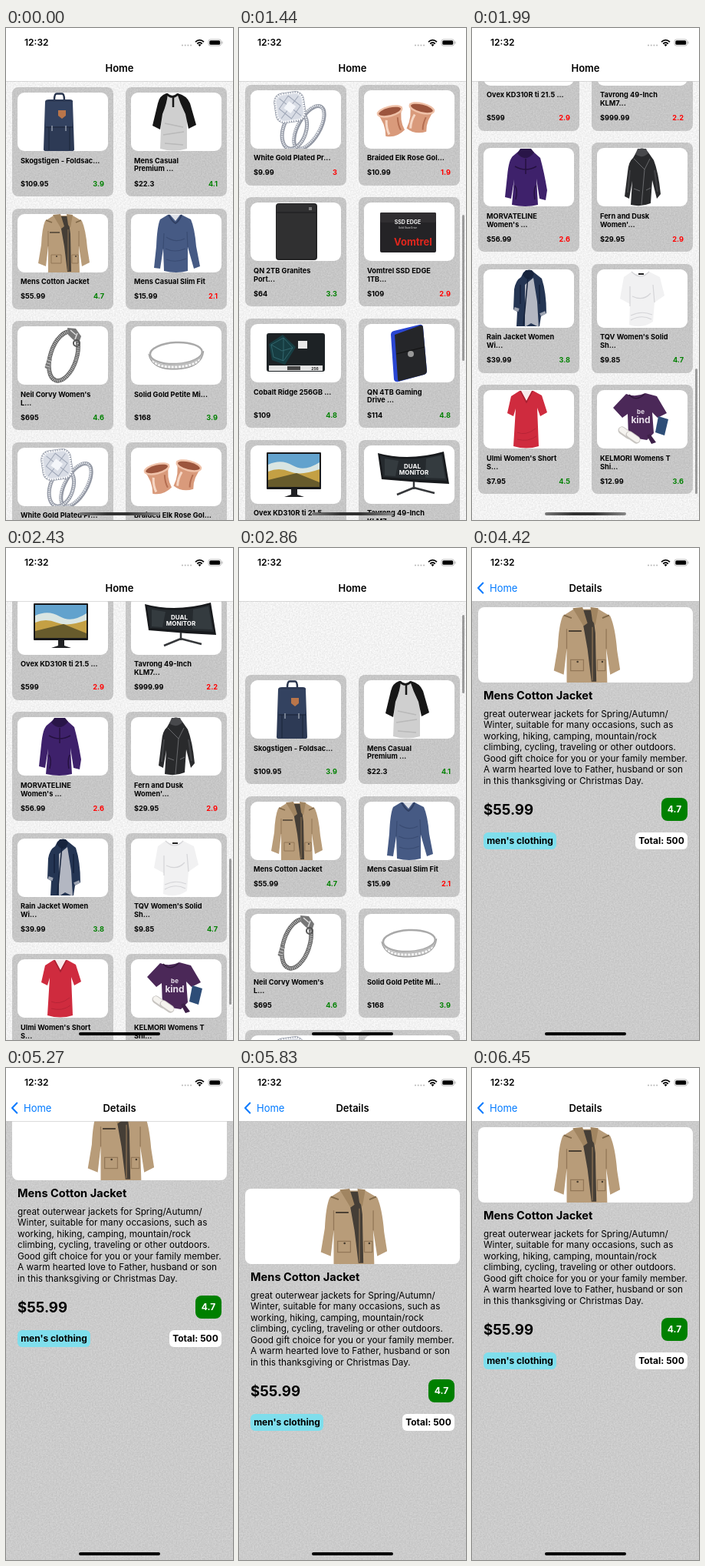
Animation of 296 by 640 pixels, one loop 6.55 s. Source, as an HTML page:

```html
<!DOCTYPE html>
<html lang="en">
<head>
<meta charset="utf-8">
<title>Shop</title>
<style>
html, body { margin: 0; width: 296px; height: 640px; overflow: hidden; background: #fff; }
body { position: relative; font: 600 13px/16px Inter, sans-serif; color: #000; }
div, svg { position: absolute; white-space: pre; }
svg { left: 0; top: 0; }
.page { inset: 0; overflow: hidden; background: #fff; will-change: transform; }
.scroll { left: 0; top: 0; width: 296px; will-change: transform; }
#details { background: #d6d6d6; }

.card { width: 132px; border-radius: 8px; background: rgba(0,0,0,.18); font: 700 9.2px/10.9px Inter, sans-serif; }
.photo { left: 7px; top: 7px; width: 118px; height: 76px; border-radius: 9px; background: #fff; overflow: hidden; }
.name { left: 11px; top: 90.5px; }
.price { left: 11px; bottom: 10.5px; }
.rate { right: 12px; bottom: 10.5px; color: #008000; }
.low { color: #f00; }
#thumb { left: 291px; width: 3px; border-radius: 2px; background: rgba(0,0,0,.36); }

.bar { left: 0; top: 0; width: 296px; height: 69px; background: #fff; box-shadow: 0 .6px 0 #c4c4c4; overflow: hidden; }
.title { left: 0; top: 44px; width: 296px; text-align: center; }
#back { left: 23px; top: 44px; font-weight: 400; color: #007aff; }
.clock { left: 24px; top: 11px; font-size: 12px; }

.hero { left: 8px; top: 77px; width: 280px; height: 98px; border-radius: 8px; background: #fff; overflow: hidden; }
.head { left: 15px; top: 183px; font: 700 14.6px/18px Inter, sans-serif; }
.about { left: 15px; top: 208.8px; font: 400 11.75px/14.45px Inter, sans-serif; }
.cost { left: 15px; top: 328px; font: 700 18.6px/24px Inter, sans-serif; }
.tag { height: 22px; border-radius: 6px; text-align: center; font: 700 12px/22px Inter, sans-serif; }
#home { left: 95px; top: 630px; width: 106px; height: 4px; border-radius: 2px; }
</style>
</head>
<body>
<div class="page" id="list">
  <svg width="296" height="640">
    <filter id="grain" x="0" y="0" width="1" height="1" color-interpolation-filters="sRGB">
      <feTurbulence type="fractalNoise" baseFrequency=".55" numOctaves="2" seed="4"/>
      <feColorMatrix values="0 0 0 0 0  0 0 0 0 0  0 0 0 0 0  .14 0 0 0 -.02"/>
    </filter>
    <rect width="296" height="640" filter="url(#grain)"/>
  </svg>
  <div class="scroll" id="grid"></div>
  <div id="thumb"></div>
</div>

<div class="page" id="details">
  <svg width="296" height="640"><rect width="296" height="640" filter="url(#grain)"/></svg>
  <div class="scroll" id="info">
    <div class="hero"><svg id="hero" width="280" height="98" viewBox="0 0 118 76"></svg></div>
    <div class="head">Mens Cotton Jacket</div>
    <div class="about">great outerwear jackets for Spring/Autumn/
Winter, suitable for many occasions, such as
working, hiking, camping, mountain/rock
climbing, cycling, traveling or other outdoors.
Good gift choice for you or your family member.
A warm hearted love to Father, husband or son
in this thanksgiving or Christmas Day.</div>
    <div class="cost">$55.99</div>
    <div class="tag" style="left:247px;top:325px;width:34px;height:30px;line-height:30px;border-radius:8px;background:#008000;color:#fff">4.7</div>
    <div class="tag" style="left:15px;top:370px;width:95px;background:#7fdeec">men's clothing</div>
    <div class="tag" style="left:213px;top:370px;width:68px;background:#fff">Total: 500</div>
  </div>
</div>

<div class="bar">
  <div class="clock">12:32</div>
  <svg width="296" height="69" fill="none">
    <path d="M230 22.5h13" stroke="#b5b5b5" stroke-width="2" stroke-linecap="round" stroke-dasharray="0 3.7"/>
    <path d="M247 18.2q5.5-5 11 0M249.2 20.5q3.3-3 6.6 0" stroke="#000" stroke-width="1.7"/>
    <path d="M250.5 21.8q2-1.6 4 0l-2 2.2z" fill="#000"/>
    <rect x="264" y="14.9" width="16.5" height="8.2" rx="2.5" stroke="#aaa" stroke-width=".8"/>
    <rect x="265.3" y="16.2" width="13.9" height="5.6" rx="1.5" fill="#000"/>
    <path d="M282 17.5v3" stroke="#aaa"/>
    <path id="chevron" d="M14.3 45.5L8 52l6.3 6.500" stroke="#007aff" stroke-width="2" stroke-linecap="round" stroke-linejoin="round"/>
  </svg>
  <div class="title" id="homeTitle">Home</div>
  <div id="back">Home</div>
  <div class="title" id="detailTitle">Details</div>
</div>
<div id="home"></div>

<script>
const $ = id => document.getElementById(id);
const fill = (d, c) => `<path d="${d}" fill="${c}"/>`;
const line = (d, c, w = 1, extra = '') => `<path d="${d}" fill="none" stroke="${c}" stroke-width="${w}" ${extra}/>`;
const oval = (x, y, rx, ry, c, w, extra = '') =>
  `<ellipse cx="${x}" cy="${y}" rx="${rx}" ry="${ry}" fill="none" stroke="${c}" stroke-width="${w}" ${extra}/>`;
const box = (x, y, w, h, c, r = 0) => `<rect x="${x}" y="${y}" width="${w}" height="${h}" rx="${r}" fill="${c}"/>`;
const label = (x, y, size, c, s) => `<text x="${x}" y="${y}" font-size="${size}" fill="${c}" text-anchor="middle">${s}</text>`;
const turn = (a, x, y, s) => `<g transform="rotate(${a} ${x} ${y})">${s}</g>`;

// Drawn in a 118 x 76 box
const art = {
  backpack:
    line('M48 10Q48 1.5 51 1.5H58Q61 1.5 61 10', '#27334c', 2.5) +
    fill('M36 12Q36 9 41 9H68Q73 9 72 13L74 74Q74 76 71 76H37Q34 76 34 74Z', '#2d3a55') +
    fill('M36 12h36v32H36Z', '#334260') + line('M37 45H72M41 45V75M68 45V75', '#1b2439') +
    line('M45 43v7M63 43v7', '#8f98a8', 1.5) + fill('M53 23h10v7l-5 4-5-4Z', '#b9754a'),
  raglan:
    fill('M45 3H64L73 20V73Q56 78 38 73L40 22Z', '#cfcfcf') +
    line('M44 40l24 5M42 55l27-4M44 66l24 2', '#b9b9b9', 1.5) +
    fill('M46 1Q37 4 35 14L28 43 38 48 41 28Q47 14 48 1Z', '#161616') +
    fill('M61 1Q73 4 77 14L85 42 75 47 71 28Q64 14 60 1Z', '#161616') +
    line('M47 2Q54 9 61 2M55 5V19', '#161616', 2.5),
  jacket:
    fill('M47 2H72L84 9Q89 20 91 44L94 63 84 68 80 42 81 76H40L40 42 37 68 27 64 31 40Q32 18 36 9Z', '#b89c79') +
    fill('M54 3H66L69 26 70 75H65L61 42Z', '#453e36') +
    fill('M46 1L56 0 61 16 57 19ZM72 1L64 0 66 14 69 18Z', '#a18561') +
    line('M40 42V22M80 42V22M44 53h13v11H44ZM71 53h8v11h-8Z', '#927757') +
    line('M42 24h13', '#4b4033', 1.5) + line('M37 8l8 3M83 8l-7 3', '#806848', 1.5) +
    line('M66 20V74', '#8d7353') + box(50, 54, 2, 2, '#443a2e', 1) + box(75, 54, 2, 2, '#443a2e', 1),
  pullover:
    fill('M48 1H66L78 7Q83 18 85 42L90 68 82 71 74 43V74Q59 78 43 74L42 45 38 71 30 70 33 42Q34 16 38 7Z', '#465a84') +
    line('M49 1Q54 10 58 12Q62 10 66 1', '#2f3f63', 2) + fill('M51 1H64L58 9Z', '#dfe2e8') +
    line('M46 30q12 8 24 2M45 45q12 6 26 0M46 59q12 5 26-1M42 45l1-20M74 43l-1-20', '#394b72', 1.2),
  bracelet: turn(18, 60, 39,
    oval(60, 39, 17, 33, '#555', 5.5) + oval(60, 39, 17, 33, '#b8b8b8', 4, 'stroke-dasharray="1.3 1"') +
    box(41, 47, 6, 14, '#777', 2) + line('M41 50h6M41 54h6M41 58h6', '#ccc')) +
    fill('M65 2L76 3 83 13 80 22 72 17 66 11Z', '#777') + line('M69 5l7 6M78 9l-3 8', '#ddd', 1.5) +
    oval(77, 22, 4, 4, '#555', 2),
  ring: turn(-3, 59, 38,
    oval(59, 35, 34, 14, '#a9a9a9', 2.5) + fill('M23 34Q26 56 59 56T95 34Q92 48 59 49T23 34Z', '#bcbcbc') +
    line('M27 44Q37 53 59 53T91 44', '#f4f4f4', 3, 'stroke-dasharray="3 1.5"') +
    line('M23 34Q26 56 59 56T95 34', '#858585', .8)),
  diamond:
    turn(30, 72, 48, oval(76, 46, 14, 31, '#9297a3', 5) + oval(75, 46, 14, 31, '#e4e7ec', 2.5, 'stroke-dasharray="1.5 1"')) +
    turn(18, 58, 50, oval(58, 52, 15, 25, '#9297a3', 5) + oval(58, 52, 15, 25, '#e4e7ec', 2.5, 'stroke-dasharray="1.5 1"')) +
    turn(-8, 52, 20, box(31, 2, 40, 40, '#858c9b', 12) +
      '<rect x="33" y="4" width="36" height="36" rx="10" fill="#d8dce5" stroke="#f5f6f8" stroke-width="3" stroke-dasharray="2 1"/>' +
      line('M39 9l25 26M64 9L38 35M51 7L37 22 51 37 65 22Z', '#9da5b5') + fill('M51 14l8 8-8 8-8-8Z', '#f4f6fa')),
  tunnels: [[-14, 37, 41], [14, 72, 37]].map(([a, x, y]) => turn(a, x, y,
    fill(`M${x - 17} ${y - 16}Q${x - 9} ${y} ${x - 13} ${y + 16}Q${x} ${y + 22} ${x + 13} ${y + 14}Q${x + 9} ${y} ${x + 17} ${y - 16}Z`, '#d99a7b') +
    `<ellipse cx="${x}" cy="${y - 14}" rx="16" ry="6" fill="#9c553d" stroke="#efc1a8" stroke-width="2.5"/>` +
    line(`M${x - 7} ${y - 4}q-3 10-1 19`, '#f6d7c5', 3) + line(`M${x + 8} ${y - 4}q-2 10 0 17`, '#b46d50', 2))).join(''),
  drive: box(33, 1, 54, 74, '#242425', 4) + box(34, 2, 51, 71, '#303031', 3) +
    line('M34 13h51', '#1b1b1c') + box(76, 6, 4, 4, '#777'),
  ssd: box(21, 13, 73, 52, '#242326', 2) + box(21, 13, 73, 13, '#302e31', 2) +
    label(57, 28, 7, '#eee', 'SSD EDGE') + label(57, 34, 3, '#aaa', 'Solid State Drive') + label(64, 56, 13, '#e0261d', 'Vomtrel'),
  card: box(21, 12, 76, 50, '#1d2225', 3) + fill('M24 26L42 14 59 30 45 53 28 47Z', '#173d42') +
    line('M27 27l16-9 12 13-12 17-13-5Zl14 8 14-4M43 18v18l-1 12', '#387078', .8) +
    box(62, 22, 12, 10, '#e8e8e8') + box(24, 54, 70, 7, '#e4e4e4') + box(48, 55, 17, 5, '#454545') + label(84, 60, 5, '#222', '256'),
  gaming: fill('M35 14Q35 10 39 9L72 1Q76 0 77 4L82 61Q82 65 78 66L45 75Q40 76 39 72Z', '#2a46d2') +
    fill('M40 14L73 2Q77 1 77 5L82 61Q82 65 78 66L47 74Q44 75 44 71Z', '#252629') +
    line('M42 39L79 30', '#111') + '<circle cx="61" cy="39" r="4" fill="#999"/>',
  monitor: box(21, 9, 71, 48, '#18191b', 1) + box(23, 11, 67, 43, '#62a2cd') +
    fill('M23 25Q40 17 55 26T90 22V40H23Z', '#d9e5e2') + fill('M23 34Q37 28 51 34T90 31V54H23Z', '#c4a044') +
    fill('M23 45L60 36 90 48V54H23Z', '#675b2c') + fill('M53 57h8v7l9 3H44l9-3Z', '#202124'),
  wide: fill('M18 10Q58 21 104 8L111 50Q66 48 23 44Z', '#17191c') + fill('M21 13Q59 23 102 11L108 46Q66 44 25 41Z', '#252a2e') +
    fill('M27 17L45 20 41 40 27 39ZM81 17L101 13 106 43 80 42Z', '#343b3f') +
    label(63, 30, 8, '#fff', 'DUAL') + label(65, 38, 8, '#fff', 'MONITOR') +
    line('M65 47V57M65 55L43 64M65 55L92 62', '#35373a', 2.5),
  hoodie: fill('M45 5Q54-3 65 5L74 13Q79 31 83 55L81 68 73 66 69 40 71 74Q55 78 37 74L40 41 36 66 28 64 31 36Q33 14 39 10Z', '#3e216b') +
    fill('M44 7Q55 20 66 6L62 1H48Z', '#291548') + line('M55 14V34M41 24q14 8 28 0M41 49q4 6 1 18M68 49q-3 7-1 18', '#25113f', 1.5),
  leather: fill('M51 6Q58-5 67 6L74 16Q80 31 83 60L78 66 72 42 70 72Q58 77 44 74L46 43 42 66 36 63 40 31Q41 18 47 13Z', '#292a2c') +
    fill('M50 8Q58 15 67 7L64 1H53Z', '#48494c') + line('M48 14L62 28 58 74M69 14L62 28M48 53l8 3M64 55l6-3', '#696a6d') +
    line('M43 29l-3 29M75 29l4 28', '#414245', 2),
  rain: fill('M52 4Q60-3 66 4L76 12Q82 30 82 57L75 61 73 74H43L44 55 39 52 40 26Q42 14 49 10Z', '#243553') +
    fill('M54 20L65 11 70 42 72 75 62 70 54 75Z', '#b3b7c2') + fill('M51 7Q60 20 66 6L63 1H55Z', '#17243d') +
    line('M58 10L52 73M48 20V45M73 20V45', '#15223b', 1.5) + line('M40 51l6 2M74 59l7-3', '#9da4b2', 4),
  blouse: fill('M45 3Q57 11 68 3L82 10 88 34 75 43 73 68Q58 78 42 72L43 45 30 38 35 10Z', '#f1f1f2') +
    line('M45 3Q57 15 68 3M43 22V48M73 20L75 43M44 60q14-7 28-1M44 66q14-8 27-1M46 35q14 7 24-4', '#d5d5d8', 1.2) + box(54, 5, 7, 2, '#222'),
  tee: fill('M47 1L65 1 76 7 83 29 74 34 70 23 72 73Q56 78 39 73L42 24 39 34 31 30 36 8Z', '#cf2b3e') +
    fill('M49 1H63L56 14Z', '#f7e9ea') + line('M48 1L56 16 64 1', '#a61f30', 1.5) + line('M44 55q11 5 24-5M44 64q14 4 25-4', '#b72436'),
  kind: fill('M38 5Q50 10 63 4L78 8 91 30 79 36 72 29 74 56 65 65 41 61 40 31 33 36 21 23Z', '#4b2858') +
    line('M42 6Q51 16 62 5', '#2f1739', 1.5) + label(57, 31, 8, '#e8dfeb', 'be') + label(57, 43, 12, '#e8dfeb', 'kind') +
    fill('M80 34L93 38 88 59 76 55Z', '#2d4d77') + fill('M69 57l8 11-6 2-6-11Z', '#3d2048') +
    [[0, 0], [10, 6]].map(([x, y]) => turn(35, 36 + x, 56 + y, box(26 + x, 50 + y, 21, 10, '#c7c4c0', 5) + box(27 + x, 51 + y, 19, 7, '#f5f3ef', 4))).join('')
};

const goods = [
  ['backpack', 'Skogstigen - Foldsac...', 109.95, 3.9], ['raglan', 'Mens Casual\nPremium ...', 22.3, 4.1],
  ['jacket', 'Mens Cotton Jacket', 55.99, 4.7], ['pullover', 'Mens Casual Slim Fit', 15.99, 2.1],
  ['bracelet', "Neil Corvy Women's\nL...", 695, 4.6], ['ring', 'Solid Gold Petite Mi...', 168, 3.9],
  ['diamond', 'White Gold Plated Pr...', 9.99, 3], ['tunnels', 'Braided Elk Rose Gol...', 10.99, 1.9],
  ['drive', 'QN 2TB Granites\nPort...', 64, 3.3], ['ssd', 'Vomtrel SSD EDGE\n1TB...', 109, 2.9],
  ['card', 'Cobalt Ridge 256GB ...', 109, 4.8], ['gaming', 'QN 4TB Gaming\nDrive ...', 114, 4.8],
  ['monitor', 'Ovex KD310R ti 21.5 ...', 599, 2.9], ['wide', 'Tavrong 49-Inch\nKLM7...', 999.99, 2.2],
  ['hoodie', "MORVATELINE\nWomen's ...", 56.99, 2.6], ['leather', "Fern and Dusk\nWomen'...", 29.95, 2.9],
  ['rain', 'Rain Jacket Women\nWi...', 39.99, 3.8], ['blouse', "TQV Women's Solid\nSh...", 9.85, 4.7],
  ['tee', "Ulmi Women's Short\nS...", 7.95, 4.5], ['kind', 'KELMORI Womens T\nShi...', 12.99, 3.6]
];

function buildGrid() {
  let y = 77, html = '';
  for (let i = 0; i < goods.length; i += 2) {
    const row = goods.slice(i, i + 2);
    const h = row.some(g => g[1].includes('\n')) ? 142 : 131;
    row.forEach(([pic, name, price, rate], col) => {
      html += `<div class="card" style="left:${8 + col * 148}px;top:${y}px;height:${h}px">
        <div class="photo"><svg width="118" height="76" font-weight="700">${art[pic]}</svg></div>
        <div class="name">${name}</div><div class="price">$${price}</div>
        <div class="rate ${rate <= 3 ? 'low' : ''}">${rate}</div></div>`;
    });
    y += h + 15.6;
  }
  $('grid').innerHTML = html;
  $('hero').innerHTML = art.jacket;
}

// [time, value] pairs; motion advances on these beats and holds between them
const LOOP = 6550, END = 982;
const listKeys = [[0, 0], [1220, 60], [1330, 255], [1440, 465], [1560, 655], [1670, 795], [1770, 890],
  [1890, 968], [1990, 1009], [2090, 993], [2190, END], [2430, 945], [2540, 710], [2650, 410], [2750, 130],
  [2860, -88], [2980, -72], [3100, -38], [3210, -16], [3330, -5], [3450, 0]];
const pushKeys = [[0, 0], [3990, 0], [4100, .38], [4210, .78], [4310, .95], [4420, 1]];
const pullKeys = [[0, 0], [4950, -3], [5050, -9], [5160, -19], [5270, -29], [5370, -33], [5510, 10],
  [5610, 70], [5720, 124], [5820, 80], [5930, 36], [6030, 15], [6130, 7], [6230, 4], [6340, 2], [6450, 0]];
const at = (keys, t) => keys.filter(k => k[0] <= t).pop()[1];
const shift = (id, x, y = 0) => { $(id).style.transform = `translate(${x}px,${y}px)`; };
const fade = (id, o) => { $(id).style.opacity = o; };

function draw(t) {
  const y = at(listKeys, t), p = at(pushKeys, t);
  shift('grid', 0, -y);
  const inside = Math.max(0, Math.min(END, y));
  const size = 190 - Math.abs(y - inside);
  const thumb = $('thumb').style;
  thumb.height = size + 'px';
  thumb.top = 87 + inside / END * 329 + (y > END ? 190 - size : 0) + 'px';
  fade('thumb', t < 1220 ? 0 : 1);

  shift('list', -p * 89);
  shift('details', (1 - p) * 296);
  shift('info', 0, at(pullKeys, t));
  shift('homeTitle', -108 * p);
  shift('back', 108 * (1 - p));
  shift('detailTitle', 148 * (1 - p));
  fade('homeTitle', 1 - p);
  ['back', 'chevron', 'detailTitle'].forEach(id => fade(id, p));
  $('home').style.background = t < 2430 ? 'linear-gradient(90deg,#777,#333 35%,#333 60%,#888)' : '#000';
}

buildGrid();
const start = performance.now();
function tick() {
  draw((performance.now() - start) % LOOP);
  requestAnimationFrame(tick);
}
tick();
</script>
</body>
</html>
```
